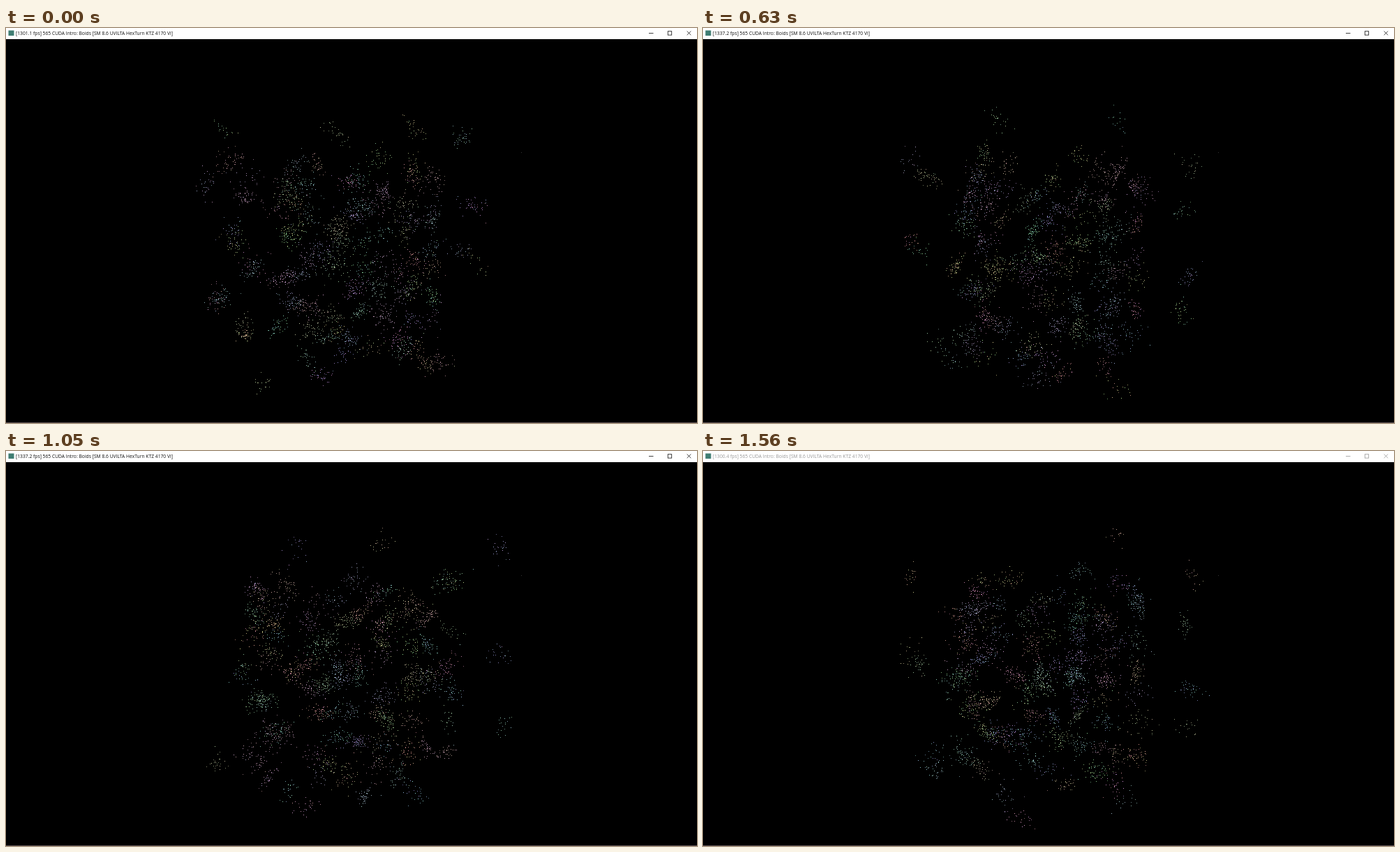
Recreate the animation shown at these times as an HTML page with a canvas. Size 990 by 566 pixels, loop 1.58 s.

```html
<!DOCTYPE html>
<html lang="en">
<head>
<meta charset="utf-8">
<title>Boids</title>
<style>
  html, body { margin: 0; width: 100%; height: 100%; overflow: hidden; background: #000; }
  canvas { position: absolute; left: 0; top: 0; }
  #bar {
    position: absolute; left: 0; top: 0; width: 990px; height: 16px;
    background: #fff; color: #111;
    font: 6.74px/15px "Open Sans", "Noto Sans", sans-serif; white-space: pre;
  }
  #bar.inactive { color: #999; }
  #caption { position: absolute; left: 14px; top: 0; }
  #bar svg { position: absolute; left: 0; top: 0; }
</style>
</head>
<body>
<canvas id="stage" width="990" height="566"></canvas>
<div id="bar">
  <span id="caption"></span>
  <svg width="990" height="16">
    <rect x="3.5" y="3.5" width="8" height="7.5" fill="#3f7d72"/>
    <g fill="none" stroke="currentColor" stroke-width=".8">
      <path d="M921 7.5h6.5M975.7 4.5l5.6 5.6m0-5.6l-5.6 5.6"/>
      <rect x="948.3" y="4.7" width="5.4" height="5.4"/>
    </g>
  </svg>
</div>
<script>
const LOOP = 1580;
const STARTS = [0, 120, 240, 360, 480, 630, 770, 890, 1050, 1170, 1290, 1440, 1560];
const FLOCKS = 88;
const CENTER = { x: 488, y: 333 };
const HALF = { x: 250, y: 228 };
const PLASTIC = 1.22074408;  // spreads flocks evenly through three dimensions

const ctx = document.getElementById("stage").getContext("2d");
const bar = document.getElementById("bar");
const caption = document.getElementById("caption");

function seededRandom(seed) {
  return () => {
    seed = (seed + 0x6D2B79F5) | 0;
    let n = Math.imul(seed ^ (seed >>> 15), 1 | seed);
    n = (n + Math.imul(n ^ (n >>> 7), 61 | n)) ^ n;
    return ((n ^ (n >>> 14)) >>> 0) / 4294967296;
  };
}

function drawFlock(random, x, y, count, size) {
  const gauss = () => Math.sqrt(-2 * Math.log(1 - random())) * Math.cos(2 * Math.PI * random());
  const hue = random() * 360;
  const saturation = 25 + 25 * random();
  const angle = random() * Math.PI;
  const cos = Math.cos(angle), sin = Math.sin(angle);
  const narrow = size * (0.45 + 0.45 * random());
  for (let i = 0; i < count; i++) {
    const u = gauss() * size, v = gauss() * narrow;
    const px = Math.floor(x + u * cos - v * sin);
    const py = Math.floor(y + u * sin + v * cos);
    const tint = hue + gauss() * 25;
    const alpha = 0.55 + 0.45 * random();
    if (px < 235 || px > 738 || py < 101 || py > 564) continue;
    ctx.fillStyle = `hsla(${tint}, ${saturation}%, 70%, ${alpha})`;
    ctx.fillRect(px, py, 1, 1);
  }
}

// Flocks fill a cube seen in perspective, so they crowd towards its centre.
function drawCloud(random) {
  const offsets = [random(), random(), random()];
  for (let i = 1; i <= FLOCKS; i++) {
    const [u, v, depth] = offsets.map((offset, axis) => (offset + i / PLASTIC ** (axis + 1)) % 1);
    const scale = 1 / (1 + depth);
    const side = (2 * u - 1) * scale;
    const rise = (2 * v ** 1.1 - 1) * scale;
    const y = CENTER.y + HALF.y * rise;
    const taper = 1 - 0.75 * Math.max(0, (y - 430) / 135);
    const x = CENTER.x + HALF.x * side * taper;
    const edge = Math.max(Math.abs(side), Math.abs(rise));
    const count = 8 + (14 + 42 * random()) * (1.15 - edge ** 2);
    drawFlock(random, x, y, count, 8 + 5 * random());
  }
}

function drawPose(index) {
  const start = STARTS[index];
  ctx.fillStyle = "#000";
  ctx.fillRect(0, 0, 990, 566);
  drawCloud(seededRandom(index * 97 + 11));
  ctx.fillStyle = "#333";
  ctx.fillRect(738, 178, 1, 1);
  ctx.fillStyle = "#5d4f4f";
  ctx.fillRect(0, 565, 990, 1);

  const fps = start < 240 ? "1301.1" : start < 1290 ? "1337.2" : "1300.4";
  caption.textContent = `[${fps} fps] 565 CUDA Intro: Boids [SM 8.6 UVILTA HexTurn KTZ 4170 Vi]`;
  bar.className = start >= 1560 ? "inactive" : "";
}

let shown = -1;
function tick() {
  const time = performance.now() % LOOP;
  const index = STARTS.findLastIndex(start => start <= time);
  if (index !== shown) drawPose(shown = index);
  requestAnimationFrame(tick);
}
tick();
</script>
</body>
</html>
```
